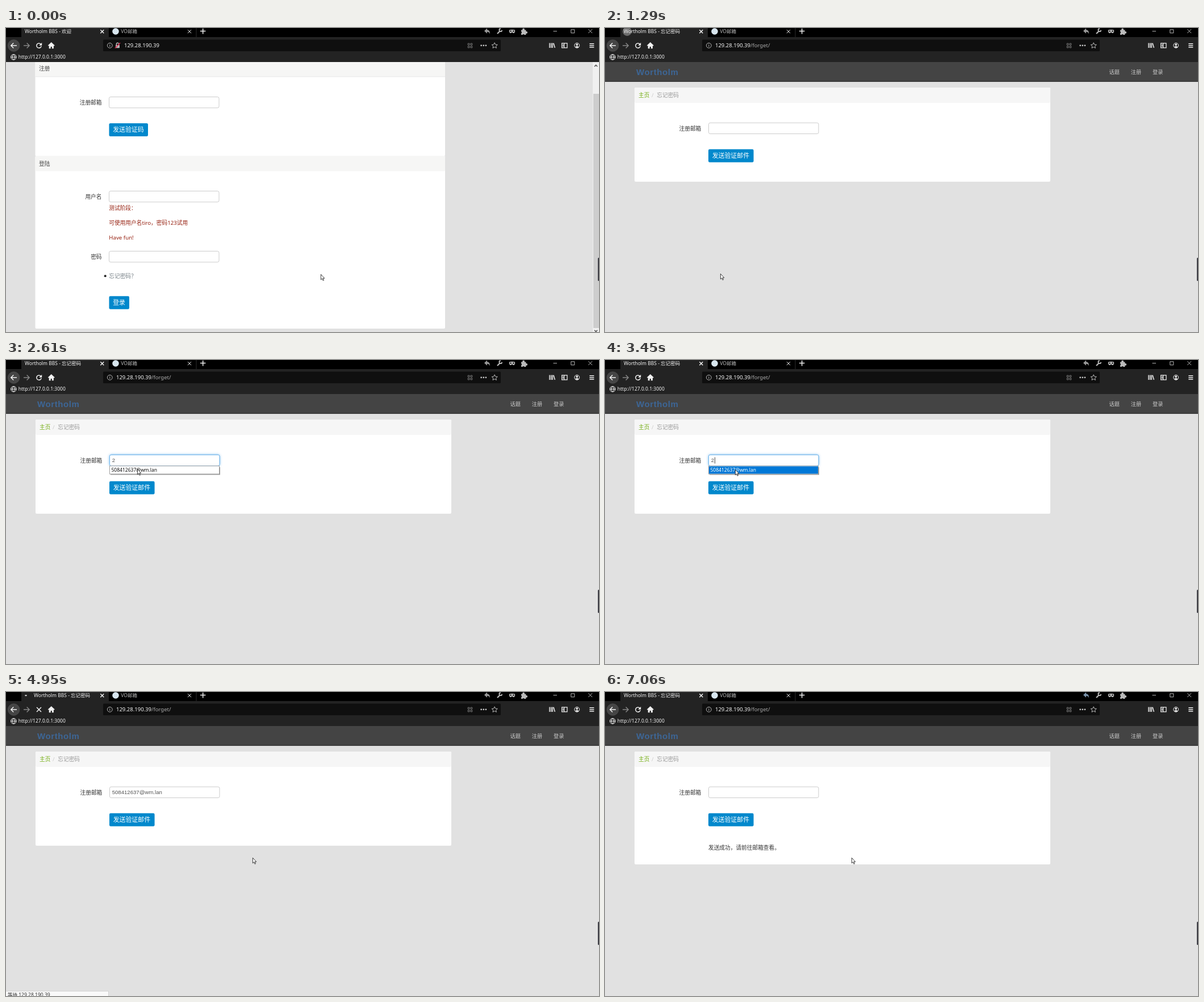
Recreate the animation shown at these times as an HTML page. Size 1044x536 px, loop 8000 ms.

```html
<!DOCTYPE html>
<html lang="zh">
<head>
<meta charset="utf-8">
<title>Wortholm BBS</title>
<style>
html, body { margin: 0; height: 100%; overflow: hidden; background: #e1e1e1; }
svg { display: block; width: 100vw; height: 100vh; }
text { font-family: "Noto Sans", "Open Sans", "Noto Sans CJK SC", "Noto Sans CJK", sans-serif; white-space: pre; }
.arial { font-family: "Liberation Sans", Arial, sans-serif; }
.line { fill: none; stroke: #f2f2f2; stroke-width: 1.5; }
.thin { stroke-width: 1; }
.dim { stroke: #b8b8b8; }
#focus { filter: drop-shadow(0 0 2px rgba(82,168,236,.75)); }
</style>
</head>
<body>
<svg id="stage" viewBox="0 0 1044 536" preserveAspectRatio="none"></svg>
<script>
const SITE = 'Wortholm', MAIL = '508412637@wm.lan', HOST = '129.28.190.39';
const BLUE = '#0088cc', BODY = 9.7, UI = 8.5;

// Markup helpers
const rect = (x, y, w, h, fill, more = '') => `<rect x="${x}" y="${y}" width="${w}" height="${h}" fill="${fill}" ${more}/>`;
const text = (x, y, s, fill = '#333', size = BODY, more = '') => `<text x="${x}" y="${y}" fill="${fill}" font-size="${size}" ${more}>${s}</text>`;
const label = (x, y, s) => text(x, y, s, '#333', BODY, 'text-anchor="end"');
const line = (d, cls = '', more = '') => `<path class="line ${cls}" d="${d}" ${more}/>`;
const shape = (d, fill, more = '') => `<path d="${d}" fill="${fill}" ${more}/>`;
const dot = (x, y, r, fill, more = '') => `<circle cx="${x}" cy="${y}" r="${r}" fill="${fill}" ${more}/>`;
const group = (id, ...parts) => `<g id="${id}">${parts.join('')}</g>`;
const input = (x, y) => rect(x + .5, y + .5, 193.5, 19.3, '#fff', 'rx="2.7" stroke="#ccc"');
const button = (x, y, w, s, id = 'b') => rect(x, y, w, 23, BLUE, `rx="2.3" id="${id}"`) + text(x + 6.7, y + 15.4, s, '#fff', 10.9);
const cross = (x, y, r, cls = '', more = '') => line(`M${x - r} ${y - r}l${2 * r} ${2 * r}m0 ${-2 * r}l${-2 * r} ${2 * r}`, cls, more);

const loginPage = group('login',
  rect(51.5, 50, 721.5, 176, '#fff', 'rx="2"'),
  rect(51.5, 60, 721.5, 26, '#f6f6f5'), rect(51.5, 85.5, 721.5, .8, '#e4e4e4'),
  text(58, 75.3, '注册', '#444'),
  label(168.5, 134.5, '注册邮箱'), input(181, 121),
  button(181.5, 168, 68.5, '发送验证码'),
  rect(51.5, 225.5, 721.5, 304.5, '#fff', 'rx="2"'),
  rect(51.5, 225.5, 721.5, 27, '#f6f6f5', 'rx="2"'),
  text(58, 243, '登陆', '#444'),
  label(168.5, 300.8, '用户名'), input(181, 287),
  text(181.3, 321, '测试阶段：', '#962010'),
  text(181.3, 347, '可使用用户名tiro，密码123试用', '#962010'),
  text(181.3, 373, 'Have fun!', '#962010'),
  label(168.5, 406.5, '密码'), input(181, 393),
  dot(174.7, 437.2, 2, '#222'),
  text(181.3, 440.6, '忘记密码？', '#778087', BODY, 'id="link"'),
  button(181.5, 472.7, 35.5, '登录'),
  rect(1033, 60, 11, 476, '#f0f0f0'), rect(1034, 116, 10, 413, '#cdcdcd'),
  line('M1036 68l2.6-2.6 2.6 2.6M1036 532.8l2.6 2.6 2.6-2.6', '', 'style="stroke:#505050"'));

const forgetPage = group('forget',
  rect(0, 60, 1044, 35, '#444'), rect(0, 93.5, 1044, 1.5, '#3a3a3a'),
  text(55, 82.6, SITE, '#3d6696', 15, 'class="arial" font-weight="bold" letter-spacing=".6"'),
  ...['话题', '注册', '登录'].map((s, i) => text(887.5 + i * 38.3, 81.2, s, '#ccc', 9.2)),
  rect(52, 105, 732, 166, '#fff', 'rx="2.2" id="panel"'),
  rect(52, 105, 732, 27, '#f6f6f6', 'rx="2.2"'),
  text(59, 122.2, '主页', '#72ad10'), text(82, 122.2, '/', '#ccc'), text(91.3, 122.2, '忘记密码', '#999'),
  label(169.3, 180.6, '注册邮箱'), input(182, 166.7),
  `<rect id="focus" x="182.5" y="167.2" width="193.5" height="19.3" rx="2.7" fill="#fff" stroke="#6db5ee"/>`,
  text(186.7, 180.2, '', '#555', 9.6, 'class="arial" id="field"'),
  rect(0, 171.5, .8, 11, '#222', 'id="caret"'),
  button(182, 213.8, 79.6, '发送验证邮件', 'send'),
  group('done', text(182, 278, '发送成功，请前往邮箱查看。')),
  group('drop',
    rect(184, 189, 193, 13.5, '#999'),
    rect(182.5, 186.8, 193, 14.2, '#fff', 'stroke="#a0a0a0"'),
    rect(183, 187.5, 192, 13, '#0078d7', 'id="pick"'),
    text(185.5, 196.7, MAIL, '#111', UI, 'id="option"')));

const reloadIcon = group('reload', line('M61.3 28.4A4.2 4.2 0 1 0 62.2 31.8'), shape('M63.2 25.8v4.9h-4.9z', '#f2f2f2'));
const tabs = [
  rect(0, 0, 1044, 60, '#232323'), rect(0, 0, 1044, 16, '#000'), rect(27, 0, 154, 16, '#232323'),
  rect(334.5, 0, 1, 16, '#2c2c2c'),
  `<clipPath id="tab"><rect x="28" y="0" width="153" height="16"/></clipPath>`,
  `<g clip-path="url(#tab)">${dot(39, 6, 8, '#fff', 'id="burst"')}</g>`,
  rect(0, 4.9, 3, 2.4, '#ccc', 'rx="1.2" id="busy"'),
  text(33, 9, '', '#f4f4f4', UI, 'id="title"'), cross(169.3, 6.2, 3),
  dot(193, 6, 5.8, '#d8e6ef'), text(202.3, 9, 'VO邮箱', '#b8b8b8', UI), cross(323, 6.2, 3, 'thin'),
  line('M342 5.6h9.4M346.7 1v9.4'),
  shape('M842 5.2l5-4.7v2.7c3.7.3 5.2 2.8 4.6 7.2-.9-2.6-2.1-3.7-4.6-3.7v3z', '#999', 'id="undo"'),
  line('M865 10l4.5-4.5', '', 'style="stroke:#bbb;stroke-width:2.2"'),
  line('M870.8 1.3a2.4 2.4 0 1 0 2.4 2.6', '', 'style="stroke:#bbb;stroke-width:1.9"'),
  shape('M886 3.6q5-1.5 10 0 1 3.2-1 5.2-2.6 1-4-1.6-1.4 2.6-4 1.6-2-2-1-5.2z', '#bbb'),
  dot(888.6, 5.5, 1.2, '#111'), dot(893.4, 5.5, 1.2, '#111'),
  shape('M907 3.5h2.3a2 2 0 1 1 3.6 0h2.6v2.6a1.9 1.9 0 1 1 0 3.5V12h-3a1.7 1.7 0 0 0-3 0H907V9.3a1.7 1.7 0 0 0 0-3.1z', '#bbb'),
  line('M963.5 5.7h6.5M994.8 2.8h6v6h-6z', 'thin dim'), cross(1028.7, 5.6, 3.4, 'thin dim')];

const toolbar = [
  dot(13.6, 31, 10.3, '#454545', 'stroke="#555" stroke-width=".7"'),
  line('M19 31H9M13.3 26.5L8.8 31l4.5 4.5'),
  line('M31 31h10M36.6 26.5l4.5 4.5-4.5 4.5', '', 'style="stroke:#858585"'),
  reloadIcon, cross(58, 31, 4, '', 'id="stop"'),
  shape('M79.8 25l-6 5.8 1 1 .9-.8v5.2h3v-3.3h2.2v3.3h3V31l.9.8 1-1z', '#f2f2f2'),
  rect(171, 20.5, 700, 20.5, '#0f0f0f', 'rx="1.5"'),
  line('M178.4 30.8a4.4 4.4 0 1 0 8.8 0a4.4 4.4 0 1 0-8.8 0M182.8 30v3M182.8 28v1', 'thin dim'),
  group('lock', rect(193, 30, 7, 5.2, '#b8b8b8', 'rx=".8"'),
    line('M194.4 30v-1.6a2.1 2.1 0 0 1 4.2 0V30', 'dim'),
    line('M192 35.6l9-9.4', '', 'style="stroke:#e0284f"')),
  text(208, 34.4, '', '#f6f6f6', 9.5, 'id="url"'),
  line('M813.2 27.2h2.8v2.8h-2.8zM818 27.2h2.8v2.8h-2.8zM813.2 32h2.8v2.8h-2.8zM818 32h2.8v2.8h-2.8z', 'thin', 'style="stroke:#777"'),
  ...[836.7, 840.8, 844.9].map(x => dot(x, 30.8, 1.4, '#c8c8c8')),
  line('M860.2 25.8l1.5 3.3 3.6.4-2.7 2.4.8 3.5-3.2-1.8-3.2 1.8.8-3.5-2.7-2.4 3.6-.4z', 'thin dim'),
  line('M957 26.5v8.5M959.7 26.5v8.5M962.3 26.5v8.5M964 26.7l2.4 8.2'),
  line('M978.6 26.8h9.4v8h-9.4zM982.7 26.8v8', '', 'style="stroke-width:1.2"'),
  shape('M979.8 28.6h2v4.5h-2z', '#aaa'),
  line('M1000.8 30.8a4.4 4.4 0 1 0 8.8 0a4.4 4.4 0 1 0-8.8 0', 'thin'),
  dot(1005.2, 29.4, 1.8, '#f2f2f2'), shape('M1002 33.4q3.2-2.6 6.4 0-3.2 2.8-6.4 0z', '#f2f2f2'),
  line('M1027.3 27.8h8M1027.3 30.9h8M1027.3 34h8'),
  line('M8.6 51.3a4.8 4.8 0 1 0 9.6 0a4.8 4.8 0 1 0-9.6 0h9.6M13.4 46.5q-4.6 4.8 0 9.6q4.6-4.8 0-9.6', 'thin'),
  text(21.8, 54.2, 'http://127.0.0.1:3000', '#f2f2f2', UI)];

const outlined = 'stroke="#111" stroke-width=".8" stroke-linejoin="round"';
const overlay = [
  rect(1042, 405, 4, 41, '#3b3b43', 'rx="1.5"'),
  group('status', rect(-1, 527.5, 181.5, 12, '#f9f9f9', 'stroke="#d2d2d2"'), text(3, 537.3, '', '#333', UI, 'id="note"')),
  group('cursor',
    shape('M.4.4V9.8l2.1-2 1.6 3.5 1.4-.6L4 7.3h2.8z', '#fff', `id="arrow" ${outlined}`),
    shape('M-1 7V.9a1 1 0 0 1 2 0V4.6l4 .8q1.4.3 1.3 1.8l-.6 3.2-1 2.5H-.2L-3.6 8.6q-.5-1.2.8-1.3L-1 8.8z', '#fff', `id="hand" ${outlined}`),
    line('M-2-5.5h4M-2 5.5h4M0-5.5v11', 'thin', 'id="beam" style="stroke:#222"'))];

document.getElementById('stage').innerHTML =
  [rect(0, 0, 1044, 536, '#e1e1e1'), loginPage, forgetPage, ...tabs, ...toolbar, ...overlay].join('');

const el = id => document.getElementById(id);
const show = (id, on) => el(id).style.display = on ? '' : 'none';
const set = (id, attrs) => { for (const k in attrs) el(id).setAttribute(k, attrs[k]); };
const write = (id, s) => { if (el(id).innerHTML !== s) el(id).innerHTML = s; };
const clamp = v => Math.max(0, Math.min(1, v));

// Pointer path: time, x, y
const PATH = [[130, 554, 434], [670, 203, 433], [1370, 203, 433], [1910, 232, 178], [2380, 232, 178],
  [2610, 231, 192], [3160, 231, 192], [3300, 229, 193], [3500, 229, 193], [3920, 231, 229],
  [4000, 231, 229], [4150, 229.5, 229], [4480, 229.5, 229], [4950, 434, 292]];

function pointer(t) {
  let i = PATH.findIndex(p => p[0] > t);
  if (i < 0) return PATH[PATH.length - 1].slice(1);
  if (!i) return PATH[0].slice(1);
  const [a, b] = [PATH[i - 1], PATH[i]], u = (t - a[0]) / (b[0] - a[0]), e = u * u * (3 - 2 * u);
  return [a[1] + (b[1] - a[1]) * e, a[2] + (b[2] - a[2]) * e];
}

function draw(t) {
  const within = (a, b) => t >= a && t < b;
  const login = t < 1290, [x, y] = pointer(t);
  const over = (l, top, r, bottom) => x >= l && x < r && y >= top && y < bottom;

  // Pages
  show('login', login);
  show('forget', !login);
  const onLink = login && over(181, 429, 230, 445);
  set('link', { 'text-decoration': onLink ? 'underline' : 'none' });
  const onSend = !login && over(182, 214, 262, 237), onField = !login && over(182, 167, 376, 187);
  set('send', { fill: onSend ? '#0055cc' : BLUE });
  set('focus', { opacity: clamp((t - 1980) / 240) * clamp((4700 - t) / 200) });
  write('field', within(2380, 3480) ? '2' : within(3480, 6440) ? MAIL : '');
  show('caret', within(2060, 2600) || within(3160, 3600) || within(4000, 4500));
  set('caret', { x: t < 2380 ? 187 : t < 3480 ? 193 : 276 });
  show('drop', within(2460, 3480));
  show('pick', t >= 3160);
  set('option', { fill: t >= 3160 ? '#fff' : '#111' });
  show('done', t >= 6440);
  set('panel', { height: t >= 6440 ? 199 : 166 });

  // Tab and toolbar
  const loading = within(1130, 1290) || within(4480, 6440);
  const bare = within(1200, 1290) || within(6300, 6440);
  write('title', bare ? HOST + '/forget/' : `${SITE} BBS - ${login ? '欢迎' : '忘记密码'}`);
  set('title', { x: loading ? 49 : within(6440, 6520) ? 45 : 33 });
  show('busy', loading);
  const swing = Math.PI * (t - (login ? 1040 : 5025)) / 580;
  const w = 3 + 1.5 * Math.abs(Math.sin(swing));
  set('busy', { x: 39 - 4.3 * Math.cos(swing) - w / 2, width: w });
  const p = (t - (t < 4000 ? 1230 : 6440)) / 400;
  set('burst', { r: 7 + 6 * clamp(p), opacity: !login && p >= 0 ? .4 * clamp(1 - p) : 0 });
  set('undo', { fill: bare ? '#444' : t >= 6440 ? '#7b93ab' : '#999' });
  const stopping = within(4560, 6520);
  show('stop', stopping);
  show('reload', !stopping);
  set('reload', { opacity: within(6520, 7060) ? .45 : 1 });
  const path = t >= 1130 ? '<tspan fill="#aaa">/forget/</tspan>' : '';
  write('url', HOST + path);
  set('url', { x: login ? 208 : 194 });
  show('lock', login);

  // Status line
  const note = within(820, 1130) ? HOST + '/forget/'
    : within(1130, 1290) || within(4560, 6300) ? '等待 ' + HOST
    : within(6300, 6440) ? `正在传输来自 ${HOST} 的数据` : '';
  show('status', note);
  set('status', { opacity: within(820, 900) ? .5 : 1 });
  write('note', note);

  // Pointer
  set('cursor', { transform: `translate(${x} ${y})` });
  const hand = onLink || onSend;
  show('hand', hand);
  show('beam', onField);
  show('arrow', !hand && !onField);
}

function tick() {
  draw(performance.now() % 8000);
  requestAnimationFrame(tick);
}
tick();
</script>
</body>
</html>
```
